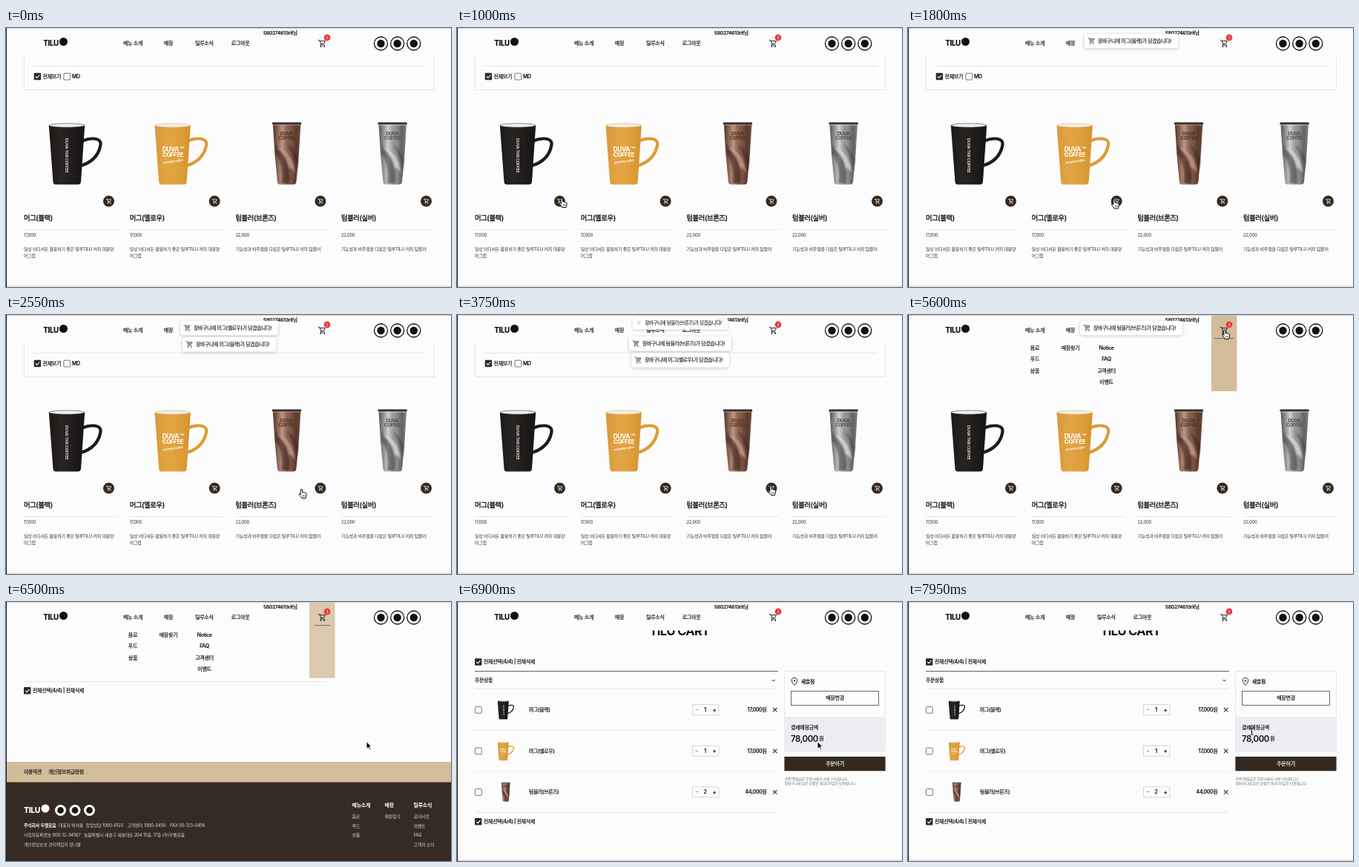
Write an HTML page that moves like this. It is 600x350 px and loops after 8 s.

```html
<!DOCTYPE html>
<html lang="ko">
<head>
<meta charset="utf-8">
<title>Shop cart</title>
<style>
html, body { margin: 0; width: 100%; height: 100%; overflow: hidden; background: #fcfcfc; }
svg { display: block; width: 600px; height: 350px; }
text { font-family: Inter, "Noto Sans CJK KR", "Noto Sans CJK", sans-serif; letter-spacing: -.04em; }
.toast rect { filter: drop-shadow(0 1px 2px rgba(0, 0, 0, .22)); }
</style>
</head>
<body>
<svg id="stage" viewBox="0 0 600 350"></svg>
<script>
const LOOP = 8000, DARK = '#33291f', TAN = '#d2bd9b', BG = '#fcfcfc';
const BRAND = 'TILU', BRAND_KO = '틸루', BOTTOM = -177;

// Text centred vertically on y; a hairline stroke gives a medium weight
const T = (x, y, s, size = 7, { w = 500, c = '#111', a = 'start', x: more = '' } = {}) =>
  `<text x="${x}" y="${y + size * .36}" font-size="${size}" font-weight="${w}" fill="${c}" text-anchor="${a}"` +
  `${w === 500 ? ` stroke="${c}" stroke-width="${size * .028}"` : ''}${more}>${s}</text>`;
const mid = (x, y, s, size, o) => T(x, y, s, size, { ...o, a: 'middle' });
const rect = (x, y, w, h, fill, more = '') => `<rect x="${x}" y="${y}" width="${w}" height="${h}" fill="${fill}" ${more}/>`;
const box = (x, y, w, h, stroke, more) => rect(x, y, w, h, 'none', `stroke="${stroke}" stroke-width=".8" ${more || ''}`);
const disc = (x, y, r, fill, more = '') => `<circle cx="${x}" cy="${y}" r="${r}" fill="${fill}" ${more}/>`;
const line = (d, c, w = .8, more = '') => `<path d="${d}" fill="none" stroke="${c}" stroke-width="${w}" ${more}/>`;
const shape = (d, fill, more = '') => `<path d="${d}" fill="${fill}" ${more}/>`;
const rule = (x, y, w, c = '#e2e2e2') => line(`M${x} ${y}h${w}`, c);
const put = (x, y, s, body) => `<g transform="translate(${x} ${y}) scale(${s})">${body}</g>`;

const cart = (x, y, s, c, w = 2, fill = 'none') => put(x - 11 * s, y - 12 * s, s,
  shape('M5.400 5.200H20.200L16.200 12.500H8.600Z', fill) +
  line('M1 3h3.2l4.4 9.5h7.6L20.2 5.2H5.4M8.6 12.5L6.6 16.3H19', c, w) + disc(8, 20, 1.9, c) + disc(17.5, 20, 1.9, c));
const check = (x, y, on) => on
  ? rect(x, y - 4.7, 9.4, 9.4, DARK, 'rx="1"') + line(`M${x + 2.3} ${y}l1.9 2 3.2-3.9`, '#fff', 1.1)
  : box(x + .4, y - 4.3, 8.8, 8.8, '#555', 'rx="1"');

const gradient = (id, ...stops) => `<linearGradient id="${id}">${stops.map((c, i) =>
  `<stop offset="${i / (stops.length - 1)}" stop-color="${c}"/>`).join('')}</linearGradient>`;

function mug(color, grad, print) {
  return line('M79 152.500C90 148 106 147.500 103.300 159C100.500 173 92 181.500 77 186', color, 4.2) +
    shape('M33.800 131.500H82.200L77 208Q76.500 211.500 73 211.500H43Q40 211.500 39.500 208Z', `url(#${grad})`) +
    `<ellipse cx="58" cy="131.600" rx="24" ry="2.600" fill="#f1f0ee" stroke="${color}" stroke-width=".5"/>` + print;
}
function tumbler(grad, dark, light, ink) {
  return shape('M50.500 130H88L85.500 170L82 208Q81.500 211.500 78 211.500H60Q57 211.500 56.500 208L53 170Z', `url(#${grad})`) +
    `<g filter="url(#soft)">` + shape('M54 158C62 166 70 176 72 192Q74 202 72 210H62C64 196 62 180 54 170Z', dark, 'opacity=".65"') +
    shape('M56 162C68 164 79 176 80 196Q77 190 72 188C70 176 64 168 56 162Z', light, 'opacity=".75"') +
    shape('M70 158Q80 164 85 178L83 194Q80 172 70 158Z', dark, 'opacity=".6"') + '</g>' +
    rect(49.4, 127.6, 39.4, 3, '#34302e', 'rx="1.2"') + rule(50.5, 131, 37.5, light) +
    mid(69, 143, 'DUVA', 6.3, { c: ink, w: 700 }) + mid(69, 149, 'COFFEE', 6, { c: ink, w: 700 });
}
const white = { c: '#fff', w: 700 };
const art = [
  mug('#1e1b1a', 'black', T(0, 0, 'DUVA TKR COFFEE', 5.4, { c: '#eee', w: 600, x: ' transform="translate(58 149) rotate(90)"' })),
  mug('#dc9c38', 'yellow', T(44, 164, 'DUVA', 8.3, white) + T(68, 162, 'TKR', 3, white) + T(44, 171.3, 'COFFEE', 7.8, white) +
    T(0, 0, 'everyday coffee', 3.8, { c: '#fff', x: ' font-style="italic" transform="translate(45 182) rotate(-8)"' })),
  tumbler('bronze', '#3d251d', '#c9a08e', '#4a2f26'),
  tumbler('silver', '#4a4a4a', '#dedede', '#4b4b4b')
];
const names = ['머그(블랙)', '머그(옐로우)', '텀블러(브론즈)', '텀블러(실버)'];
const cardX = [24, 166.7, 309.4, 452];

function shopPage() {
  const grey = { c: '#333', w: 400 };
  const cards = names.map((name, i) => {
    const isMug = i < 2;
    const desc = isMug ? `일상 어디서든 활용하기 좋은 ${BRAND_KO}${BRAND} 커피 대용량` : `기능성과 비주얼을 다잡은 ${BRAND_KO}${BRAND} 커피 텀블러`;
    return put(cardX[i], 0, 1, art[i] + disc(114.5, 234, 7.5, DARK) + cart(114.5, 234.2, .36, '#fff', 2) +
      T(0, 257, name, 9.3) + rule(0, 272.5, 125.5) + T(0, 280.3, isMug ? '17,000' : '22,000', 5.9, grey) +
      T(0, 298.5, desc, 6, grey) + (isMug ? T(0, 307.8, '머그컵', 6, grey) : ''));
  });
  return box(24.4, 20, 553.2, 63.6, '#e2e2e2') + rule(36, 51.4, 530) + check(37.7, 65.5, true) + T(49.5, 65.5, '전체보기') +
    check(77.5, 65.5) + T(89, 65.5, 'MD') + cards.join('');
}

const selectRow = y => check(24, y, true) + T(36, y, '전체선택(4/4) | 전체삭제', 6.9);

function cartPage() {
  const rows = [['17,000', 1], ['17,000', 1], ['44,000', 2]].map(([price, n], i) => {
    const y = 145.7 + 55.6 * i;
    return check(24, y) + put(66, y, .31, put(-70, -170, 1, art[i])) + T(97, y, names[i], 6.8) +
      box(317.5, y - 7, 35.5, 14, '#ccc') + mid(323.3, y, '−', 7, { c: '#777' }) + mid(334.5, y, n) + mid(347, y, '+', 8) +
      T(417.5, y, price + '원', 7, { a: 'end' }) + line(`M426 ${y - 2.7}l5.4 5.4m0-5.4l-5.4 5.4`, '#444', 1.3) + rule(24, y + 27.6, 409);
  });
  const note = { c: '#777', w: 400 };
  return mid(300, 39, BRAND + ' CART', 16.5, { w: 700 }) + selectRow(81) + rule(24, 93.6, 409, '#333') + T(24, 105.8, '주문상품', 6.8) +
    line('M424.500 105l2.200 2.200l2.200-2.200', '#333', 1) + rule(24, 117.4, 409) + rows.join('') + selectRow(296.8) +
    box(441.4, 93.6, 136.2, 108.5, '#e2e2e2') + rect(441.4, 155, 136.2, 47.4, '#ecedf2') +
    line('M455 112.500C449.500 107 450.500 102.500 455 102.500S460.500 107 455 112.500Z', '#222', 1) + line('M453.800 106.500h2.400', '#222', 1.6) +
    T(464, 107.3, '새솔점', 6.8, { w: 600 }) + box(450.5, 120.4, 118, 19, '#444') + mid(509.5, 129.7, '매장변경') +
    T(450, 169.5, '결제예정금액') + T(450, 184.6, '78,000', 11.5, { w: 600 }) + T(488.3, 184.6, '원', 7) +
    rect(441.4, 209, 136.2, 19.3, DARK) + mid(509.5, 218.4, '주문하기', 7, { c: '#fff' }) +
    T(441.4, 238.8, '쿠폰/적립금은 주문서에서 사용 가능합니다.', 5, note) +
    T(441.4, 245.6, '장바구니에 담은 상품은 최대 30일간 보관됩니다.', 5, note) + put(0, -BOTTOM, 1, footer());
}

function footer() {
  const soft = { c: '#ddd6cc', w: 400 }, bold = { c: '#fff', w: 600 };
  const info = [
    [71, 302.3, '대표자 박서율'], [107.5, 302.3, '창업상담 1000-0123'], [163.5, 302.3, '고객센터 1000-0456'], [221, 302.3, 'FAX 00-123-0456'],
    [24, 315, '사업자등록번호 000-12-34567'], [105, 315, '늘봄특별시 새솔구 새솔대로 204 15층, 17층 (주)두벨로움'],
    [24, 327.8, '개인정보보호 관리책임자 정나율']
  ];
  const columns = [[466.5, '메뉴소개', '음료', '푸드', '상품'], [510.5, '매장', '매장찾기'], [549.5, BRAND_KO + '소식', '공지사항', '이벤트', 'FAQ', '고객의 소리']];
  return rect(0, 216, 600, 28, TAN) + rect(0, 243.5, 600, 107, '#352b22') + T(24, 229.8, '이용약관', 6.8) + T(57, 229.8, '개인정보취급방침', 6.8) +
    T(24, 281, BRAND, 10.5, { c: '#fff', w: 800 }) + disc(53, 279, 5.5, '#fff') +
    [73.5, 93, 112.5].map(x => disc(x, 281.5, 7.5, '#fff') + disc(x, 281.5, 4.4, '#1c1a18')).join('') +
    T(24, 302.3, '주식회사 두벨로움', 6, bold) + info.map(([x, y, s]) => T(x, y, s, 6, soft)).join('') +
    columns.map(([x, head, ...items]) => T(x, 274, head, 7, bold) + items.map((s, i) => T(x, 290 + 12.5 * i, s, 6, soft)).join('')).join('');
}

function menu() {
  const lists = [[171, '음료', '푸드', '상품'], [219, '매장찾기'], [267.5, 'Notice', 'FAQ', '고객센터', '이벤트']];
  return rect(0, 0, 600, 103, BG) + `<g id="tan">${rect(409, 1, 34.5, 102, TAN)}</g>` +
    lists.map(([x, ...items]) => items.map((s, i) => mid(x, 44 + 15.5 * i, s)).join('')).join('');
}

function header() {
  const nav = [[171, '메뉴 소개'], [219, '매장'], [267.3, BRAND_KO + '소식'], [316, '로그아웃']];
  return T(50.3, 20, BRAND, 9.8, { w: 800 }) + disc(77.5, 18.5, 5.5, '#111') + nav.map(([x, s]) => mid(x, 20, s)).join('') +
    T(347, 6.3, '580274613rit님', 6.8) + cart(426, 21, .5, '#222') + `<path id="under" stroke="#6b5f4e" stroke-width=".9"/>` +
    disc(433, 13, 4.4, '#e8383b') + mid(433, 13, '<tspan id="count">0</tspan>', 5, { c: '#fff', w: 400 }) +
    [505.5, 527.7, 549.8].map(x => disc(x, 21, 9, '#fff', 'stroke="#111" stroke-width="1.3"') + disc(x, 21, 5.2, '#111')).join('');
}

// Toasts: click time, product, half width
const toasts = [[1150, 0, 63], [2000, 1, 66], [3000, 2, 69], [3610, 2, 69]].map(([at, item, half]) => ({ at, item, half }));
const toastSvg = ({ item, half }) => `<g class="toast">${rect(-half, -9.8, half * 2, 19.6, '#fff', 'rx="4"')}<g>${cart(0, 0, .45, '#666', 2, '#aaa')}</g>` +
  T(18 - half, 0, `장바구니에 ${names[item]}가 담겼습니다!`, 6.8, { c: '#2e2e2e' }) + '</g>';

const outlined = 'stroke-width="1" stroke-linejoin="round"';
const cursors = {
  hand: put(0, -.7, .94, shape('M-1.2 7V1Q-1.2 0 0 0T1.2 1V4.600Q3 4 3.400 5Q5 4.600 5.300 5.600Q7 5.200 7 6.800V9Q7 10.500 6 12V13H.2V12L-3.400 8Q-4 6.600-2.800 6.400Q-2 6.400-1.200 7.600Z', '#fff', 'stroke="#000" ' + outlined) +
    line('M1.800 8.500v2.500M3.400 8.500v2.500M5 8.500v2.500', '#000', .6)),
  arrow: shape('M0 0V10L2.300 7.900L3.900 11.500L5.500 10.800L3.900 7.300H7.100Z', '#000', 'stroke="#fff" ' + outlined),
  beam: line('M-2-4.500Q0-4.500 0-3.300Q0-4.500 2-4.500M0-3.500V3.500M-2 4.500Q0 4.500 0 3.300Q0 4.500 2 4.500M-1 .9H1', '#111', 1)
};

const stage = document.getElementById('stage');
stage.innerHTML = '<defs>' + gradient('black', '#1b1918', '#272422', '#1f1c1b', '#171514') + gradient('yellow', '#d8983a', '#e2a443', '#dfa03c', '#d4922f') +
  gradient('bronze', '#4f3228', '#8a6252', '#bd9484', '#8d6353', '#7b5344', '#5a392d', '#6f4a3c') +
  gradient('silver', '#555', '#8f8f8f', '#cfcfcf', '#9c9c9c', '#8a8a8a', '#626262', '#808080') +
  `<filter id="soft"><feGaussianBlur stdDeviation=".8"/></filter><clipPath id="drop"><rect id="dropBox" width="600"/></clipPath></defs>` +
  rect(0, 0, 600, 350, BG) + rect(0, 348, 600, 2, '#e3e3e3') +
  `<g id="shop">${shopPage()}</g><g id="basket">${cartPage()}</g>` + rect(0, 0, 600, 38.5, BG) +
  `<g clip-path="url(#drop)">${menu()}</g>` + header() + rect(0, 0, 600, 1, '#cfcfcf') + rect(0, 0, 1, 350, '#1c1c1c') +
  [...toasts].reverse().map(toastSvg).join('') +
  `<g id="cursor">${Object.entries(cursors).map(([k, s]) => `<g id="${k}">${s}</g>`).join('')}</g>`;

const $ = id => document.getElementById(id);
const show = (el, on) => el.setAttribute('display', on ? 'inline' : 'none');
const toastEls = [...document.querySelectorAll('.toast')].reverse();

const ramp = (t, a, b) => Math.min(1, Math.max(0, (t - a) / (b - a)));
const smooth = x => x * x * (3 - 2 * x);
const bezier = (x1, y1, x2, y2) => x => {
  if (x <= 0 || x >= 1) return x <= 0 ? 0 : 1;
  const at = (u, a, b) => 3 * (1 - u) ** 2 * u * a + 3 * (1 - u) * u * u * b + u ** 3;
  let lo = 0, hi = 1;
  for (let i = 0; i < 24; i++) {
    const u = (lo + hi) / 2;
    if (at(u, x1, x2) < x) lo = u; else hi = u;
  }
  return at(lo, y1, y2);
};
const easeIn = bezier(.21, 1.02, .73, 1), easeOut = bezier(.06, .71, .55, 1);

// Pointer path: leave time, arrive time, x, y
const path = [[0, 0, -12, 215], [350, 850, 141.5, 231], [1300, 1850, 281, 232.5], [2150, 2550, 398.5, 236], [2600, 2850, 423, 232],
  [4020, 4900, 427, 21], [6050, 6460, 486, 188.5], [7000, 7650, 463.5, 175]];

function pointer(t) {
  let [, , x, y] = path[0];
  for (const [a, b, px, py] of path) {
    const k = smooth(ramp(t, a, b));
    x += (px - x) * k;
    y += (py - y) * k;
  }
  return [x, y];
}

function pointerKind(x, y, shopping, t) {
  if (x > 409 && x < 443 && y < 41) return 'hand';
  if (shopping) return y > 110 && cardX.some(c => x > c && x < c + 125.5) ? 'hand' : 'arrow';
  return t > 7000 && y < 180 ? 'beam' : 'arrow';
}

function drawToast(t, toast, i) {
  const el = toastEls[i], { at, half } = toast;
  const on = t >= at && t < at + 2400;
  show(el, on);
  if (!on) return;
  const p = easeIn(ramp(t, at, at + 350)), q = easeOut(ramp(t, at + 2000, at + 2400));
  const slot = toasts.slice(i + 1).reduce((n, o) => n + easeIn(ramp(t, o.at, o.at + 230)), 0);
  const y = 17.5 + 22.3 * slot - 40 * (1 - p) - 30 * q;
  el.setAttribute('transform', `translate(301 ${y}) scale(${.6 + .4 * p - .4 * q})`);
  el.setAttribute('opacity', (.5 + .5 * p) * (1 - q));
  const r = smooth(ramp(t, at + 120, at + 420)), icon = el.children[1];
  icon.setAttribute('transform', `translate(${9 - half} 0) scale(${.6 + .4 * r})`);
  icon.setAttribute('opacity', .4 + .6 * r);
}

function draw(t) {
  const shopping = t < 5750;
  show($('shop'), shopping);
  show($('basket'), !shopping);
  $('basket').setAttribute('transform', `translate(0 ${BOTTOM * (1 - smooth(ramp(t, 6530, 6810)))})`);

  const open = smooth(ramp(t, 4780, 5080)) - smooth(ramp(t, 6490, 6750));
  const hover = ramp(t, 4780, 5080) - ramp(t, 6440, 6740);
  $('dropBox').setAttribute('height', open > 0 ? 38.5 + 64.5 * open : 0);
  $('tan').setAttribute('opacity', hover);
  $('under').setAttribute('d', `M${426.2 - 13.5 * hover} 31.600H${426.2 + 13.5 * hover}`);
  show($('under'), hover > 0);

  $('count').textContent = new Set(toasts.filter(o => t >= o.at).map(o => o.item)).size;
  toasts.forEach((o, i) => drawToast(t, o, i));

  const [x, y] = pointer(t), kind = pointerKind(x, y, shopping, t);
  $('cursor').setAttribute('transform', `translate(${x} ${y})`);
  for (const k in cursors) show($(k), k === kind);
}

const start = performance.now();
function tick() {
  draw((performance.now() - start) % LOOP);
  requestAnimationFrame(tick);
}
tick();
</script>
</body>
</html>
```
